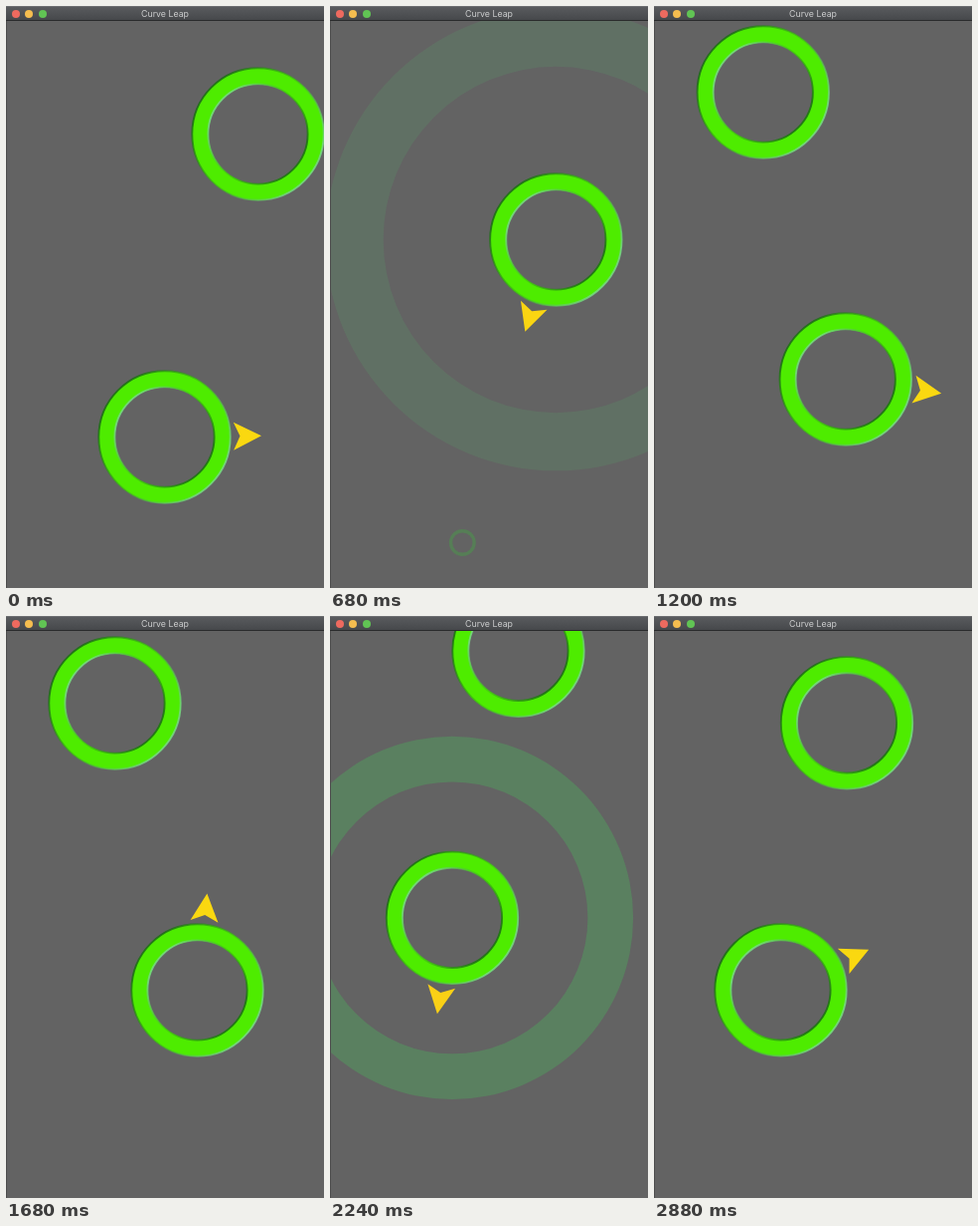
An HTML page with a canvas that plays this animation: 320 px wide and 584 px high, repeating every 2.92 s.

```html
<!DOCTYPE html>
<html lang="en">
<head>
<meta charset="utf-8">
<title>Curve Leap</title>
<style>
  html, body { margin: 0; width: 320px; height: 584px; overflow: hidden; background: #636363; }
  canvas { position: absolute; left: 0; top: 0; width: 320px; height: 584px; }
  .bar {
    position: absolute; left: 0; top: 0; width: 320px; height: 15px; box-sizing: border-box;
    background: linear-gradient(#595b5e, #46484b);
    border-top: 1px solid #6a6c6f; border-bottom: 1px solid #2a2b2c;
    font: 8.8px/14px Inter, Roboto, sans-serif; color: #cbcccd; text-align: center;
  }
  .bar i { position: absolute; top: 2.5px; width: 8px; height: 8px; border-radius: 50%; }
  .edge { position: absolute; left: 0; top: 15px; width: 1px; height: 569px; background: #4c4c4c; }
</style>
</head>
<body>
<canvas id="stage"></canvas>
<div class="edge"></div>
<div class="bar">
  <i style="left:5.7px;background:#ee6a5f"></i>
  <i style="left:19px;background:#f5bd4f"></i>
  <i style="left:32.5px;background:#61c454"></i>
  Curve Leap
</div>
<script>
const W = 320, H = 584, LOOP = 2920, STEP = 40;
const OUTER = 66.5, INNER = 49.8, ORBIT = 83;
const SPIN = 0.193;      // degrees per ms
const FADE = 345;        // ms for a ring to shrink or a pulse to close
const LAG = 15;          // ms from landing to camera and pulse
const RATE = 0.0095;     // camera easing per ms

// Ring centres in world space; angle `deg` holds at time `at`
const rings = [
  { x: 160, y: 433, at: 0, deg: -0.7, land: -1e4, launch: 405 },
  { x: 254, y: 129, at: 880, deg: 70.2, land: 606, launch: 1850, shift: [-61, 247] },
  { x: 171, y: -159, at: 2400, deg: 68, land: 2080, launch: 1e5, shift: [18, 288] },
  { x: 237.5, y: -427, land: 1e5, launch: 1e5 }
];

const canvas = document.getElementById("stage");
const ctx = canvas.getContext("2d");
const dpr = window.devicePixelRatio || 1;
canvas.width = W * dpr;
canvas.height = H * dpr;

const TURN = 2 * Math.PI;
const rad = d => d * Math.PI / 180;
const mix = (a, b, k) => a + (b - a) * k;

function camera(t) {
  let x = -0.5, y = -0.5;
  for (const { shift, land } of rings) {
    if (!shift) continue;
    const k = 1 - Math.exp(-RATE * Math.max(0, t - land - LAG));
    x += shift[0] * k;
    y += shift[1] * k;
  }
  return { x, y };
}

function orbitPose(ring, t) {
  const settle = Math.exp(-0.05 * (t - ring.land));
  const a = rad(ring.deg - SPIN * (t - ring.at) - 8.5 * settle);
  const r = ORBIT - 7 * settle;
  return { x: ring.x + r * Math.cos(a), y: ring.y + r * Math.sin(a), a };
}

function arrowPose(t) {
  const i = rings.findLastIndex(r => t >= r.land);
  const ring = rings[i];
  if (t < ring.launch) return orbitPose(ring, t);
  const next = rings[i + 1];
  const from = orbitPose(ring, ring.launch), to = orbitPose(next, next.land);
  const k = (t - ring.launch) / (next.land - ring.launch);
  return { x: mix(from.x, to.x, k), y: mix(from.y, to.y, k), a: from.a };
}

function annulus(x, y, s) {
  ctx.beginPath();
  ctx.arc(x, y, OUTER * s, 0, TURN);
  ctx.moveTo(x + INNER * s, y);
  ctx.arc(x, y, INNER * s, 0, TURN);
}

function bevel(x, y, r, from, to) {
  const d = r * 0.75;
  const g = ctx.createLinearGradient(x - d, y - d * 0.7, x + d, y + d * 0.7);
  g.addColorStop(0, from);
  g.addColorStop(0.5, "rgba(60,170,30,.45)");
  g.addColorStop(1, to);
  ctx.strokeStyle = g;
  ctx.lineWidth = 1.9;
  ctx.beginPath();
  ctx.arc(x, y, r, 0, TURN);
  ctx.stroke();
}

function drawRing({ x, y, launch }, t) {
  const s = 1 - Math.max(0, t - launch) / FADE;
  if (s <= 0) return;
  annulus(x, y, s);
  if (s < 1) {
    ctx.fillStyle = `rgba(45,215,45,${Math.min(1, s * 1.15)})`;
    ctx.fill("evenodd");
    return;
  }
  ctx.fillStyle = "#4eec00";
  ctx.fill("evenodd");
  const dark = "rgba(28,105,22,.85)", light = "rgba(120,215,135,.85)";
  bevel(x, y, OUTER - 0.3, dark, light);
  bevel(x, y, INNER + 0.3, light, dark);
}

function arrowPath({ x, y, a }) {
  const c = Math.cos(a), s = Math.sin(a);
  ctx.beginPath();
  for (const [u, v] of [[14.5, 0], [-13.5, 14], [-7, 0], [-13.5, -14]])
    ctx.lineTo(x + u * c - v * s, y + u * s + v * c);
  ctx.closePath();
}

function draw(t) {
  const cam = camera(t), pose = arrowPose(t);
  ctx.setTransform(dpr, 0, 0, dpr, 0, 0);
  ctx.fillStyle = "#636363";
  ctx.fillRect(0, 0, W, H);
  ctx.translate(cam.x, cam.y);

  const hit = rings.find(r => r.shift && t >= r.land + LAG && t < r.land + LAG + FADE);
  const p = hit ? (t - hit.land - LAG) / FADE : 0;
  const size = 4 - 3 * p;
  if (hit) {
    annulus(hit.x, hit.y, size);
    ctx.fillStyle = `rgba(${mix(93, 30, p)},${mix(217, 172, p)},${mix(135, 20, p)},${p * 0.68})`;
    ctx.fill("evenodd");
  }

  arrowPath(pose);
  ctx.fillStyle = `rgb(250,${mix(216, 196, p)},${mix(16, 30, p)})`;
  ctx.fill();

  // The closing pulse tints the arrow where they overlap
  if (hit) {
    ctx.save();
    annulus(hit.x, hit.y, size);
    ctx.clip("evenodd");
    arrowPath(pose);
    ctx.fillStyle = `rgba(100,225,10,${0.58 * p ** 2})`;
    ctx.fill();
    ctx.restore();
  }

  for (const ring of rings) drawRing(ring, t);
}

const start = performance.now();
function tick() {
  const t = (performance.now() - start) % LOOP;
  draw(Math.floor(t / STEP) * STEP);
  requestAnimationFrame(tick);
}
tick();
</script>
</body>
</html>
```
